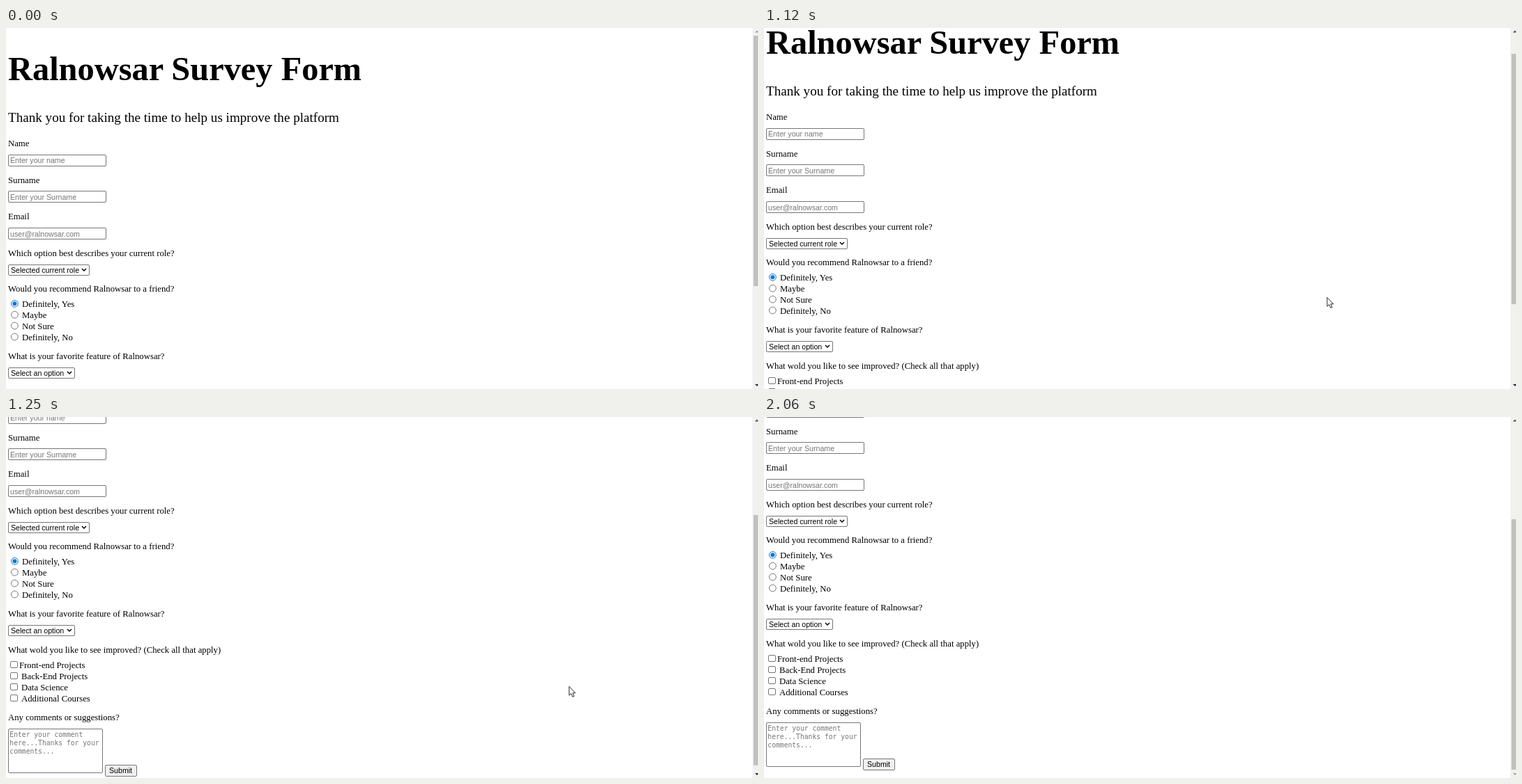
Animation of 1079x519 px, one loop 2660 ms. Source, as an HTML page:

```html
<!DOCTYPE html>
<html lang="en">
<head>
<meta charset="utf-8">
<title>Survey Form</title>
<style>
  html, body { margin: 0; width: 100%; height: 100%; overflow: hidden; background: #fff; }
  svg { display: block; }
  text { font: 12.75px "Liberation Serif", serif; white-space: pre; }
  .title { font-size: 48.4px; font-weight: bold; }
  .intro { font-size: 19.13px; }
  .ui, .hint { font: 10.63px "Liberation Sans", sans-serif; }
  .mono { font: 9.7px "DejaVu Sans Mono", monospace; }
  .hint, .mono { fill: #757575; }
  .box { fill: #fff; stroke: #767676; }
  .button { fill: #efefef; stroke: #767676; }
  .on { fill: #fff; stroke: #0b76d6; }
  .dot { fill: #0b76d6; }
  .chevron { fill: none; stroke: #000; stroke-width: 1.5; }
</style>
</head>
<body>
<svg width="1079" height="519" viewBox="0 0 1079 519">
  <g id="page"></g>
  <rect x="1071" width="8" height="519" fill="#f1f1f1"/>
  <rect id="thumb" x="1072.5" width="6.5" height="360" fill="#c1c1c1"/>
  <path id="up" d="M1074.5 6.5L1077.5 3.5L1080.5 6.5Z"/>
  <path id="down" d="M1074.5 512L1077.5 515L1080.5 512Z"/>
  <path id="cursor" d="M0 0V12.8L3 10.2L5 15L7.2 14.1L5.2 9.4H9Z" fill="#fff" stroke="#111" stroke-width=".9"/>
</svg>
<script>
const $ = id => document.getElementById(id);
const brand = "Ralnowsar";
const parts = [];

const text = (x, y, str, cls = "") => parts.push(`<text x="${x}" y="${y}" class="${cls}">${str}</text>`);
const box = (x, y, w, h, cls = "box") =>
  parts.push(`<rect x="${x + .5}" y="${y + .5}" width="${w}" height="${h}" rx="1.5" class="${cls}"/>`);
const circle = (y, r, cls) => parts.push(`<circle cx="12.4" cy="${y}" r="${r}" class="${cls}"/>`);

function field(y, label, hint) {
  text(3, y, label);
  box(3, Math.floor(y) + 12, 140, 16);
  text(6, y + 24.2, hint, "hint");
}

function select(y, label, option, width) {
  text(3, y, label);
  box(3, y + 12, width, 15);
  text(7, y + 23.5, option, "ui");
  parts.push(`<path class="chevron" d="M${width - 7} ${y + 18}l3 3l3 -3"/>`);
}

text(3, 75, brand + " Survey Form", "title");
text(3, 134.5, "Thank you for taking the time to help us improve the platform", "intro");
field(170.2, "Name", "Enter your name");
field(222.8, "Surname", "Enter your Surname");
field(275.4, "Email", `user@${brand.toLowerCase()}.com`);
select(328, "Which option best describes your current role?", "Selected current role", 116);

text(3, 379, `Would you recommend ${brand} to a friend?`);
["Definitely, Yes", "Maybe", "Not Sure", "Definitely, No"].forEach((answer, i) => {
  const y = 396.3 + i * 15.9;
  circle(y, 4.9, i ? "box" : "on");
  if (!i) circle(y, 3, "dot");
  text(23, y + 5, answer);
});

select(476, `What is your favorite feature of ${brand}?`, "Select an option", 95);

text(3, 528, "What wold you like to see improved? (Check all that apply)");
["Front-end Projects", "Back-End Projects", "Data Science", "Additional Courses"].forEach((topic, i) => {
  box(6, 540 + i * 16, 10, 9);
  text(i ? 22 : 19, 550 + i * 16, topic);
});

text(3, 625, "Any comments or suggestions?");
box(3, 637, 135, 63);
["Enter your comment", "here...Thanks for your", "comments..."].forEach((line, i) =>
  text(5.3, 649 + i * 12, line, "mono"));
box(142, 689, 45, 16, "button");
text(148, 701.3, "Submit", "ui");
$("page").innerHTML = parts.join("");

const LOOP = 2660, END = 198;
const scrollSteps = [[1320, END], [1250, 189], [1190, 122.5], [1120, 38], [0, 0]];

// Cursor glides in from the lower right, waits, and leaves the same way.
function cursorAt(t) {
  if (t < 70 || t >= 2060) return null;
  if (t < 1850) {
    const left = (1 - Math.min(5, Math.floor((t - 70) / 64)) / 5) ** 2;
    return [808 + 189 * left, 387.4 + 120 * left];
  }
  const gone = ((Math.floor((t - 1850) / 70) + 1) / 3) ** 2;
  return [808 + 149 * gone, 387.4 + 120 * gone];
}

function draw(now) {
  const t = now % LOOP;
  const scroll = scrollSteps.find(([start]) => t >= start)[1];
  $("page").setAttribute("transform", `translate(0 ${-scroll})`);
  $("thumb").setAttribute("y", 11 + scroll * 136 / END);
  $("up").setAttribute("fill", scroll ? "#505050" : "#a3a3a3");
  $("down").setAttribute("fill", scroll < END ? "#303030" : "#a3a3a3");
  const tip = cursorAt(t);
  $("cursor").setAttribute("visibility", tip ? "visible" : "hidden");
  if (tip) $("cursor").setAttribute("transform", `translate(${tip})`);
}

const start = performance.now();
(function tick() {
  draw(performance.now() - start);
  requestAnimationFrame(tick);
})();
</script>
</body>
</html>
```
